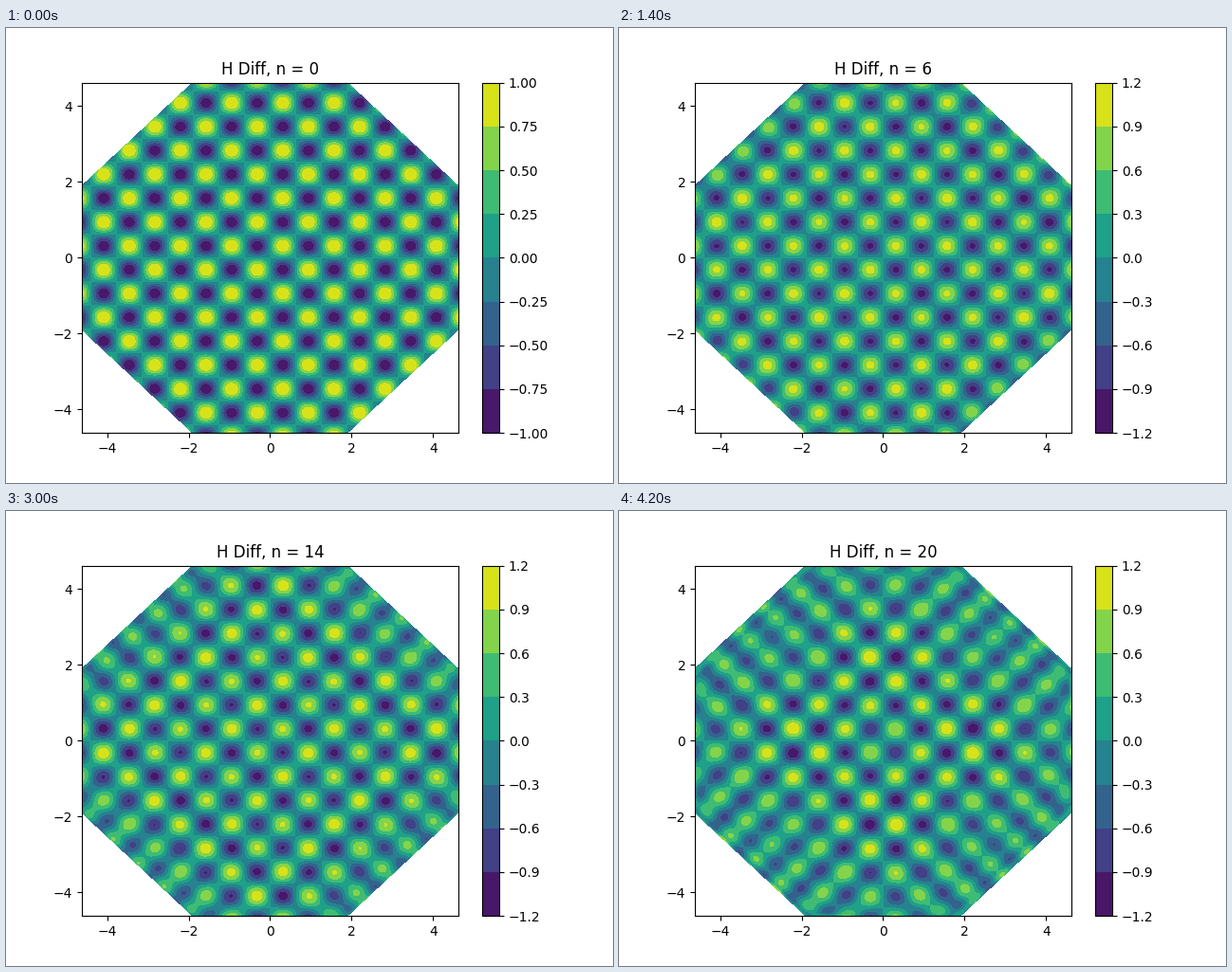
A matplotlib script for the animation above (4400 ms loop, 640x480 px).

```python
import numpy as np
import matplotlib.pyplot as plt
from matplotlib.animation import FuncAnimation

R = 5.0
L = R * np.cos(np.pi / 8)
MAX_DEG = 20


def wave(x, y):
    return np.sin(5 * x) * np.sin(5 * y)


# Polynomials sharing the wave's symmetry: odd in x, odd in y, x <-> y.
PAIRS = sorted(((i, j) for i in range(1, MAX_DEG, 2)
                for j in range(i, MAX_DEG, 2) if i + j <= MAX_DEG), key=sum)
DEGREES = np.array([i + j for i, j in PAIRS])


def basis(x, y):
    def cheb(t):
        return np.polynomial.chebyshev.chebvander(t / L, MAX_DEG)
    tx, ty = cheb(x), cheb(y)
    return np.stack([tx[:, i] * ty[:, j] + tx[:, j] * ty[:, i]
                     for i, j in PAIRS], axis=1)


def wedge_rule(m=60):
    """Quadrature over one eighth of the octagon, as two triangles."""
    t, w = np.polynomial.legendre.leggauss(m)
    t, w = (t + 1) / 2, w / 2
    r, s = (a.ravel() for a in np.meshgrid(t, t))
    weight = np.outer(w, w).ravel() * r
    corners = [(L, 0), R * np.array([np.cos(np.pi / 8), np.sin(np.pi / 8)]),
               (L / np.sqrt(2), L / np.sqrt(2))]
    xs, ys = [], []
    for (ax_, ay), (bx, by) in zip(corners, corners[1:]):
        xs.append(r * (ax_ + s * (bx - ax_)))
        ys.append(r * (ay + s * (by - ay)))
    return np.concatenate(xs), np.concatenate(ys), np.tile(weight, 2)


def residuals(x, y):
    """Wave minus its least-squares polynomial, for every even degree."""
    qx, qy, w = wedge_rule()
    root = np.sqrt(w)
    q, r = np.linalg.qr(basis(qx, qy) * root[:, None])
    coef = q.T @ (root * wave(qx, qy))
    ortho = np.linalg.solve(r.T, basis(x, y).T)
    out = []
    for n in range(0, MAX_DEG + 1, 2):
        keep = DEGREES <= n
        out.append(wave(x, y) - coef[keep] @ ortho[keep])
    return out


axis = np.linspace(-L, L, 401)
X, Y = np.meshgrid(axis, axis)
inside = np.abs(X) + np.abs(Y) <= np.sqrt(2) * L + 1e-9
fields = []
for values in residuals(X[inside], Y[inside]):
    z = np.full(X.shape, np.nan)
    z[inside] = values
    fields.append(np.ma.masked_invalid(z))

fig = plt.figure(figsize=(6.4, 4.8), dpi=100)


def draw(frame):
    n = max(frame - 1, 0)
    fig.clf()
    ax = fig.add_subplot()
    filled = ax.contourf(X, Y, fields[n // 2])
    ax.set_title(f"H Diff, n = {n}")
    fig.colorbar(filled, ax=ax)
    return []


anim = FuncAnimation(fig, draw, frames=MAX_DEG + 2, init_func=lambda: [],
                     interval=200, repeat=True, repeat_delay=0)
plt.show()
```
